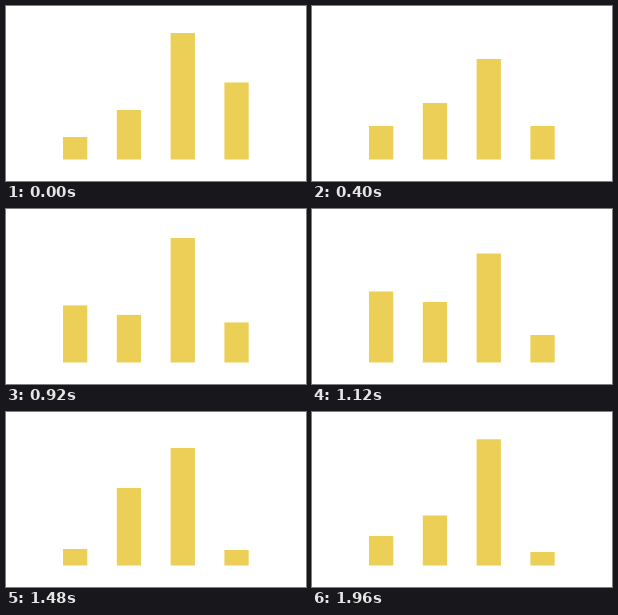
An HTML page with a canvas that plays this animation: 300x175 px, repeating every 2 s.

```html
<!DOCTYPE html>
<html lang="en">
<head>
<meta charset="utf-8">
<title>Bars</title>
<style>
html, body { margin: 0; width: 100%; height: 100%; overflow: hidden; background: #fff; }
canvas { display: block; }
</style>
</head>
<body>
<canvas width="300" height="175"></canvas>
<script>
const ctx = document.querySelector('canvas').getContext('2d');
const LOOP = 2000, STEP = 40, BASE = 153.5;
const LEFT = 57, PITCH = 53.8, WIDTH = 24.3;

// Top edge of each bar at the key times
const times = [0, 400, 720, 900, 1120, 1480, 1800, 1960];
const tops = [
  [131, 120, 110, 98, 82.5, 137, 101, 124],
  [104, 97, 114.5, 107, 93, 76, 74.5, 103.5],
  [27, 53, 39, 28.5, 44.5, 36, 36, 27.3],
  [76.5, 120, 97, 112, 126, 138, 132.5, 140]
];

function slope(values, i) {
  const a = Math.max(i - 1, 0), b = Math.min(i + 1, times.length - 1);
  return (values[b] - values[a]) / (times[b] - times[a]);
}

// Smooth cubic curve through the keys
function topAt(values, t) {
  let i = 0;
  while (i < times.length - 2 && t >= times[i + 1]) i++;
  const span = times[i + 1] - times[i];
  const u = (t - times[i]) / span, v = 1 - u;
  return values[i] * (1 + 2 * u) * v * v
    + values[i + 1] * u * u * (3 - 2 * u)
    + span * u * v * (slope(values, i) * v - slope(values, i + 1) * u);
}

function draw(now) {
  const t = Math.floor((now % LOOP) / STEP) * STEP;
  ctx.fillStyle = '#fff';
  ctx.fillRect(0, 0, 300, 175);
  ctx.fillStyle = '#eccf56';
  tops.forEach((values, i) => {
    const y = topAt(values, t);
    ctx.fillRect(LEFT + i * PITCH, y, WIDTH, BASE - y);
  });
}

const start = performance.now();
function tick() {
  draw(performance.now() - start);
  requestAnimationFrame(tick);
}
tick();
</script>
</body>
</html>
```
